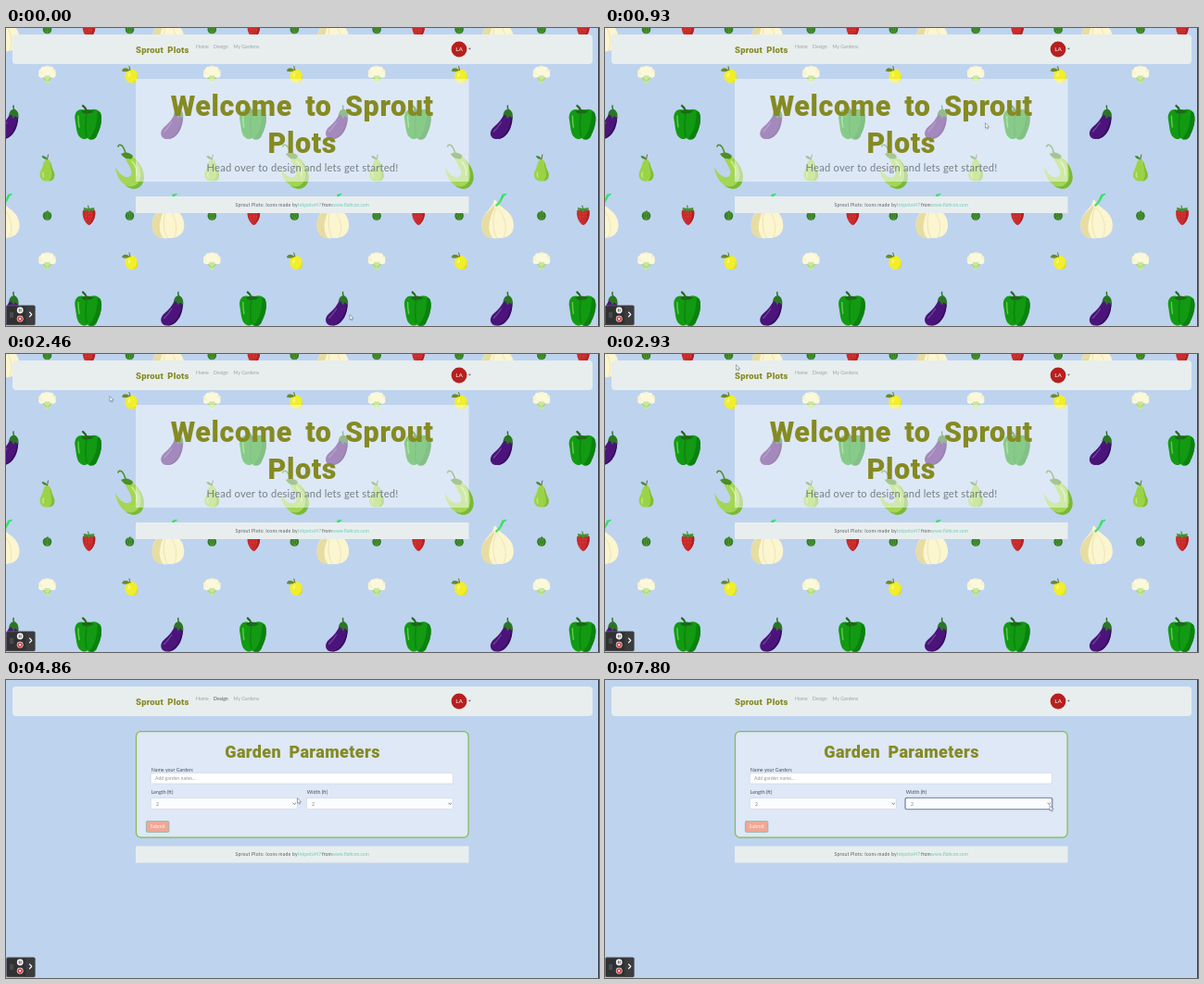
Recreate the animation shown at these times as an HTML page with a canvas. Size 640 by 322 pixels, loop 8000 ms.

```html
<!DOCTYPE html>
<html lang="en">
<head>
<meta charset="utf-8">
<title>Garden planner</title>
<style>
html, body { margin: 0; width: 100%; height: 100%; overflow: hidden; background: #bed3ee; }
canvas { display: block; width: 100vw; height: 100vh; }
</style>
</head>
<body>
<canvas id="stage"></canvas>
<script>
const W = 640, H = 322, LOOP = 8000;
const PAGE_SWITCH = 3860, FOCUS_AT = 7000, RING_FROM = 3600;
const BRAND = 'Sprout Plots';
const OLIVE = '#858a22', SKY = '#bed3ee', BAR = '#e8eeee';
const canvas = document.getElementById('stage');
const scale = Math.max(1, window.devicePixelRatio || 1);
canvas.width = W * scale;
canvas.height = H * scale;
const ctx = canvas.getContext('2d');

function fill(d, color) {
  ctx.fillStyle = color;
  ctx.fill(new Path2D(d));
}

function line(d, color, width) {
  ctx.strokeStyle = color;
  ctx.lineWidth = width;
  ctx.lineCap = ctx.lineJoin = 'round';
  ctx.stroke(new Path2D(d));
}

function oval(x, y, rx, ry, color, turn = 0) {
  ctx.beginPath();
  ctx.ellipse(x, y, rx, ry, turn, 0, Math.PI * 2);
  ctx.fillStyle = color;
  ctx.fill();
}

function box(x, y, w, h, r, color, border, width = 0.6) {
  ctx.beginPath();
  ctx.roundRect(x, y, w, h, r);
  ctx.fillStyle = color;
  ctx.fill();
  if (border) {
    ctx.strokeStyle = border;
    ctx.lineWidth = width;
    ctx.stroke();
  }
}

function text(s, x, y, size, color, { align = 'left', spacing = 0 } = {}) {
  ctx.font = `400 ${size}px Lato, sans-serif`;
  ctx.letterSpacing = spacing + 'px';
  ctx.wordSpacing = '0px';
  ctx.textAlign = align;
  ctx.fillStyle = color;
  ctx.fillText(s, x, y);
}

function heading(s, x, y, size, align = 'center') {
  ctx.font = `900 ${size}px Roboto, sans-serif`;
  ctx.letterSpacing = size * 0.02 + 'px';
  ctx.wordSpacing = size * 0.2 + 'px';
  ctx.textAlign = align;
  ctx.fillStyle = OLIVE;
  ctx.fillText(s, x, y);
}

function cauliflower() {
  fill('M-4 0L-2.5 9Q0 11 2.5 9L4 0Z', '#c9e79c');
  line('M-5 3L-1 7M5 3L1 7', '#a9d67d', 1.4);
  for (let i = 0; i < 7; i++) {
    const a = Math.PI * (1 + (i - 0.5) / 5);
    oval(Math.cos(a) * 6.2, Math.sin(a) * 5 - 1, 3.4, 3.3, i % 2 ? '#f7f3cd' : '#fbf8db');
  }
  oval(0, -3, 6, 4.5, '#fbf8db');
}

function lemon() {
  oval(1.3, 1.5, 6.8, 7.4, '#f1ee2b');
  fill('M2 7Q6 11 7 6Z', '#f1ee2b');
  fill('M6 -3Q10 4 3 8.5Q8.5 9 8.2 2Z', '#dcd922');
  oval(-1, 0, 1.2, 2.6, '#f8f77a', 0.3);
  fill('M0 -5Q-7 -10 -9 -4Q-4 -2 0 -5Z', '#6a8a2a');
  line('M0 -5L-1 -9', '#5b7427', 1);
}

function eggplant() {
  fill('M3 -11C0 -4 -4 1 -9 5C-15 10 -13 18 -6 18C3 18 11 6 11 -6Z', '#4b147a');
  fill('M10 -5C9 6 3 16 -6 18C4 19 12 6 11 -7Z', '#350b5d');
  line('M-9 10Q-5 6 -1 0', '#7a4ba3', 1.1);
  fill('M2 -11Q4 -15 8 -14Q12 -12 11.5 -4L8 -7L6 -4L4 -8L1 -8Z', '#2c7526');
  line('M7 -13Q5.5 -16 6 -18', '#2c7526', 1.5);
}

function pepper() {
  fill('M-3 -12C-9 -17 -16 -12 -14.5 -3C-13 5 -13 13 -9 16C-6 19 -3 18 -1 17C3 21 8 18 9.5 13C13 7 16 -5 12.5 -11C8 -16 3 -14 -3 -12Z', '#129a12');
  fill('M10 -12C9 -2 9 8 1 17C6 20 9 16 9.5 13C13 7 16 -5 12.5 -11Z', '#0b8110');
  line('M-2 -9Q-4 4 -2 15', '#0c860f', 1.5);
  line('M-11 -7Q-11 0 -10 5', '#67c850', 1.4);
  fill('M-8 -12Q-2 -16 6 -12Q2 -9 -1 -10Q-4 -8 -8 -12Z', '#1d6816');
  line('M-2 -12Q-3 -16 -6 -18', '#236b1b', 2.2);
}

function pear() {
  fill('M0 -10C-4.5 -10 -4 -3 -6.5 1C-10 8 -7 14 0 13.5C7 14 10 8 6.5 2C4 -3 4.5 -10 0 -10Z', '#9bd348');
  fill('M3 -7C3 1 8 7 2 13.5C8 13 9 7 6.5 2C4 -3 4.5 -6 3 -7Z', '#7fbd35');
  line('M-4 4Q-5.5 6 -4 9', '#c6eb82', 1.2);
  line('M0 -10L1 -15', '#69512b', 0.9);
  fill('M0 -10Q-5 -10 -6 -14Q-1 -14 0 -10Z', '#408d2a');
}

function chili() {
  fill('M-6 -14C4 -15 17 -1 16 12C15 24 4 27 -4 20C-11 15 -14 8 -15 0C-10 10 -2 14 2 9C5 4 -4 -5 -6 -14Z', '#a3d654');
  fill('M5 -9C12 -2 14 8 11 15C8 21 2 23 -4 20C4 27 15 24 16 12C16 3 11 -5 5 -9Z', '#78b93a');
  line('M3 -6Q9 1 8 9', '#d0ee94', 1.3);
  fill('M-9 -14Q-2 -18 4 -12Q3 -7 -1 -9Q-5 -8 -9 -14Z', '#4c8e27');
  line('M-4 -14Q-5 -20 -8 -23Q-11 -25 -12 -22', '#4c8e27', 1.6);
}

function garlic() {
  fill('M-5 -18C-2 -9 14 -7 14.5 9C15 21 5 24 -3 23.5C-12 25 -21 21 -20 8C-19 -5 -7 -9 -7 -17Z', '#fbf5d0');
  fill('M-7 -13C-9 -6 -19 -4 -20 8C-21 20 -14 24 -8 23.5C-16 13 -10 0 -6 -10Z', '#e7dca1');
  line('M-5 -9C-9 4 -8 15 -4 23', '#ece1ab', 0.9);
  line('M-3 -9C6 0 8 14 4 22', '#ece1ab', 0.8);
  line('M-4 -12Q1 -16 3 -23', '#4fe06a', 2.6);
  line('M1 -19Q3 -23 6 -24', '#27e364', 1.4);
}

function melon() {
  oval(0, 0, 4.8, 4.8, '#2d7c25');
  for (const x of [-2.5, 0, 2.5]) line(`M${x * 0.5} -4Q${x * 1.6} 0 ${x * 0.5} 4`, '#6ba53c', 0.7);
  line('M0 -4L0.5 -5.5', '#2d6420', 0.9);
}

function strawberry() {
  fill('M-6.5 -6C-8 1 -4 8.5 0 10C4 8.5 8 1 6.5 -6Q0 -9 -6.5 -6Z', '#c92a2b');
  fill('M4 -7C5 1 3 7 0 10C4 8.5 8 1 6.5 -6Z', '#b02025');
  for (let i = 0; i < 7; i++) oval((i % 3 - 1) * 3.2, Math.floor(i / 3) * 3.8 - 3, 0.35, 0.5, '#dd7a55');
  fill('M0 -8L-6 -9L-5 -5L-2 -6L0 -4L2 -6L5 -5L6 -9Z', '#3d9632');
  line('M0 -8L-1 -11', '#3d9632', 1.1);
}

const TILE = [
  [cauliflower, 44.5, 50], [lemon, 134, 50.5], [eggplant, 2, 102], [pepper, 89, 102],
  [pear, 44.5, 152], [chili, 133, 150], [garlic, 0, 203.5], [melon, 44.5, 203],
  [strawberry, 89.5, 203], [melon, 133.5, 203]
];

function pattern() {
  for (let row = -1; row < 2; row++) {
    for (let col = -1; col < 4; col++) {
      for (const [draw, x, y] of TILE) {
        ctx.save();
        ctx.translate(x + col * 177.8, y + row * 201.5);
        draw();
        ctx.restore();
      }
    }
  }
}

function navbar(activeDesign) {
  box(7, 7, 626, 32, 4, BAR);
  heading(BRAND, 140, 26.8, 9.5, 'left');
  text('Home', 205, 21.8, 5.2, '#9da3a4');
  text('Design', 224, 21.8, 5.2, activeDesign ? '#565e62' : '#9da3a4');
  text('My Gardens', 245.5, 21.8, 5.2, '#9da3a4');
  oval(489, 23, 8.4, 8.4, '#b6201f');
  text('LA', 489, 25.3, 6.5, '#fff', { align: 'center' });
  fill('M498.8 21.7H502L500.4 23.4Z', '#606568');
}

function footer(y) {
  box(140, y, 359.5, 18, 0, BAR);
  const base = y + 10.8;
  text(BRAND + ': Icons made by', 247.5, base, 5.1, '#596064', { spacing: 0.2 });
  text('Inkpetal47', 315, base, 5.2, '#70cbb5', { spacing: 0.1 });
  text('from', 341, base, 5.1, '#596064');
  text('www.flaticon.com', 352, base, 5, '#70cbb5');
}

function homePage() {
  pattern();
  box(140, 55, 359.5, 111, 0, 'rgba(254,253,255,.5)');
  heading('Welcome to Sprout', 319.7, 95, 30.5);
  heading('Plots', 319.7, 134.5, 30.5);
  text('Head over to design and lets get started!', 320, 155, 11.2, '#777e85', { align: 'center', spacing: 0.2 });
  footer(182);
}

function select(label, x, focused) {
  text(label, x + 0.8, 123, 5.3, '#4a5157');
  if (focused) box(x - 0.6, 126.7, 160, 13.6, 2, '#8493ad');
  box(x + 0.3, 127.5, 158, 12, 1.5, '#fbfcfe', focused ? '#66758f' : '#cbd3df');
  text('2', x + 6, 135.6, 5.2, '#7e858d');
  line(`M${x + 153.8} 133l1.4 1.4 1.4-1.4`, '#525960', 0.8);
}

function formPage(focused) {
  box(140.5, 55.6, 358.5, 114.5, 5, '#dee8f7', '#82bb45', 1.2);
  heading('Garden Parameters', 320, 83.5, 18);
  text('Name your Garden:', 156.8, 98.5, 5.3, '#4a5157');
  box(156.3, 100.5, 326, 11.5, 1.5, '#fff', '#cbd3df');
  text('Add garden name...', 161, 108, 5.2, '#90969e');
  select('Length (ft)', 156, false);
  select('Width (ft)', 324, focused);
  box(151.4, 152.6, 24.5, 11.8, 1.2, '#f1a796', '#86b8a5', 0.8);
  text('Submit', 163.7, 160.3, 5.3, '#fff4ee', { align: 'center' });
  footer(179.4);
}

function recorder() {
  box(0.4, 299.8, 31, 21.2, 1.5, '#303133', '#737577', 0.6);
  box(21.3, 300.3, 9.8, 20.2, 1, '#3b3c3e');
  for (let i = 0; i < 6; i++) oval(5 + (i % 2) * 2, 308 + Math.floor(i / 2) * 2, 0.5, 0.5, '#b5b7b9');
  oval(15.2, 305, 3.4, 3.4, '#f5f5f5');
  line('M14.3 303.8V306.2M16.1 303.8V306.2', '#333', 0.8);
  oval(15.2, 314.2, 3.4, 3.4, '#f3dedd');
  oval(15.2, 314.2, 2.7, 2.7, '#d43b3b');
  box(14.2, 313.2, 2, 2, 0.2, '#fff');
  line('M25.5 307.2L27.7 309.5L25.5 311.8', '#fff', 1.2);
}

// time, x, y of the pointer tip
const ROUTE = [
  [0, 371, 310], [60, 371, 310], [930, 410.5, 103], [1530, 58, 151],
  [1860, 58, 151], [1930, 50, 139], [2460, 112, 46], [2600, 112, 46],
  [2930, 141.5, 12], [3400, 202, 18], [3460, 202, 18], [3730, 228.5, 20.5],
  [3860, 228.5, 20.5], [4330, 260, 65], [4860, 314.5, 128], [5130, 312, 133],
  [5200, 312, 133], [5860, 390, 137], [6130, 390, 137], [6930, 476, 134],
  [7000, 476, 134], [7400, 479, 135], [7600, 479, 135], [7800, 480, 136], [LOOP, 480, 136]
];

function pointerAt(t) {
  const i = ROUTE.findIndex(p => p[0] > t);
  const [t0, x0, y0] = ROUTE[i - 1], [t1, x1, y1] = ROUTE[i];
  const k = (t - t0) / (t1 - t0), e = k * k * (3 - 2 * k);
  return [x0 + (x1 - x0) * e, y0 + (y1 - y0) * e];
}

function pointer(t) {
  const [x, y] = pointerAt(t);
  const clicking = t >= RING_FROM && t < PAGE_SWITCH;
  ctx.save();
  if (clicking) {
    ctx.beginPath();
    ctx.arc(228.7, 21.7, 10.3, 0, Math.PI * 2);
    ctx.fillStyle = 'rgba(255,255,255,.2)';
    ctx.fill();
    ctx.strokeStyle = '#d66a76';
    ctx.lineWidth = 1.4;
    ctx.stroke();
  }
  ctx.translate(x, y);
  const d = clicking
    ? 'M-.7 0Q0 -.7 .7 0V2.5L3 3Q4 4 3 7H-1L-2.8 4.3L-1.7 3.6L-.7 4.4Z'
    : 'M0 0V5.3L1.2 4.2L2.1 6.2L3 5.8L2.1 3.9H3.8Z';
  fill(d, '#fff');
  line(d, '#6b7480', 0.6);
  ctx.restore();
}

function frame(now) {
  const t = now % LOOP;
  const home = t < PAGE_SWITCH, focused = t >= FOCUS_AT;
  ctx.setTransform(scale, 0, 0, scale, 0, 0);
  box(0, 0, W, H, 0, SKY);
  if (home) homePage();
  else formPage(focused);
  navbar(t >= 3660 && !focused);
  recorder();
  box(639, 0, 1, H, 0, '#39404a');
  pointer(t);
  requestAnimationFrame(frame);
}

requestAnimationFrame(frame);
</script>
</body>
</html>
```
